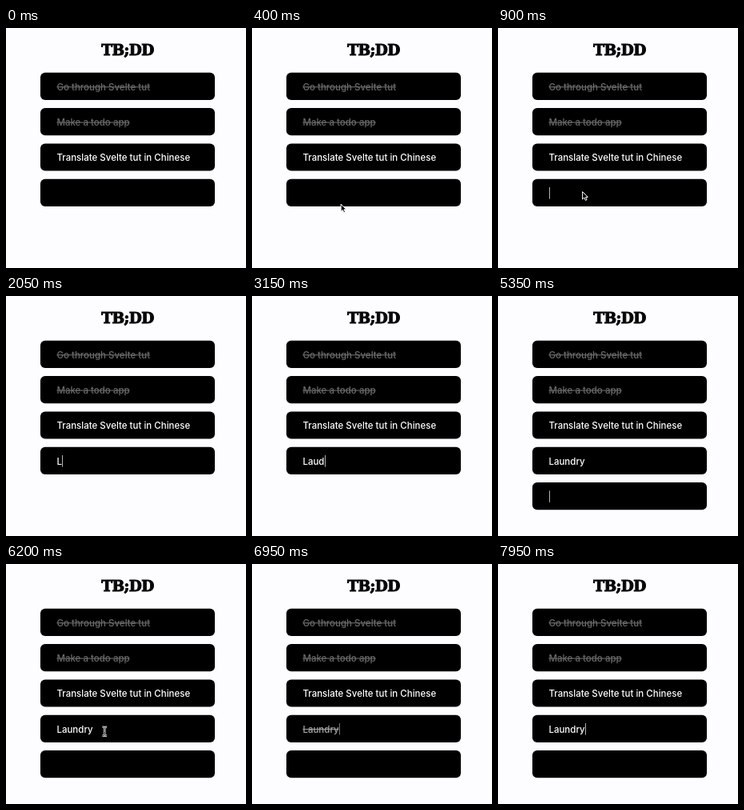
An HTML page with a canvas that plays this animation: 300 by 300 pixels, repeating every 8 s.

```html
<!DOCTYPE html>
<html lang="en">
<head>
<meta charset="utf-8">
<title>Todo list</title>
<style>
  html, body { margin: 0; width: 100%; height: 100%; overflow: hidden; background: #fdfcff; }
  canvas { display: block; width: 300px; height: 300px; }
</style>
</head>
<body>
<canvas id="stage"></canvas>
<script>
const SIZE = 300, LOOP = 8000, STEP = 50;
const ROW = { x: 42.95, y: 55.8, w: 218.1, h: 34.2, gap: 44.3, r: 6 };
const TEXT_X = 63.4, BASELINE = 21.9, DIM = 0.42;

const canvas = document.getElementById('stage');
const ctx = canvas.getContext('2d');
const dpr = window.devicePixelRatio || 1;
canvas.width = canvas.height = SIZE * dpr;
ctx.scale(dpr, dpr);

// [time, text] of the fourth item
const typing = [
  [0, ''], [2000, 'L'], [2250, 'La'], [2550, 'Lau'], [3150, 'Laud'], [3850, 'Lau'],
  [4050, 'Laun'], [4550, 'Laund'], [4850, 'Laundr'], [5050, 'Laundry']
];
// [time, row holding the visible caret, or -1]
const carets = [
  [0, -1], [900, 3], [1450, -1], [1950, 3], [3050, -1], [3150, 3], [3650, -1],
  [4050, 3], [5350, 4], [5850, -1], [6350, 4], [6550, 3], [7500, -1], [7800, 3]
];

const at = (keys, t) => keys.filter(k => k[0] <= t).pop()[1];
const clamp = v => Math.min(1, Math.max(0, v));
const mix = (a, b, u) => a + (b - a) * u;
const easeOut = u => 1 - (1 - u) ** 2;
const rowY = i => ROW.y + i * ROW.gap;
const gray = v => `rgb(${[v, v, v].map(c => Math.round(c * 255))})`;

function drawTitle() {
  ctx.font = '700 18.5px "DejaVu Serif", "Noto Serif", serif';
  ctx.letterSpacing = '-0.6px';
  ctx.textAlign = 'center';
  ctx.fillStyle = ctx.strokeStyle = '#080808';
  ctx.lineWidth = 1;
  ctx.lineJoin = 'miter';
  ctx.fillText('TB;DD', 152, 34);
  ctx.strokeText('TB;DD', 152, 34);
  ctx.letterSpacing = '0px';
}

function drawRow(i, text, light = 1, struck = false) {
  const y = rowY(i);
  ctx.fillStyle = '#000';
  ctx.beginPath();
  ctx.roundRect(ROW.x, y, ROW.w, ROW.h, ROW.r);
  ctx.fill();

  ctx.font = '500 11.5px Inter, Roboto, sans-serif';
  ctx.textAlign = 'left';
  ctx.fillStyle = gray(light);
  ctx.fillText(text, TEXT_X, y + BASELINE);
  const width = ctx.measureText(text).width;
  if (struck) ctx.fillRect(TEXT_X, y + BASELINE - 4.5, width, 1.1);
  return TEXT_X + width;
}

function drawCaret(i, x, light) {
  ctx.fillStyle = gray(0.7 * light);
  ctx.fillRect(Math.ceil(x), rowY(i) + 10.3, 1, 14.6);
}

function drawArrow(x, y) {
  ctx.save();
  ctx.translate(x, y);
  ctx.beginPath();
  [[0.6, 0.6], [0.6, 10], [2.8, 8], [4.3, 11.4], [6, 10.7], [4.5, 7.4], [7.3, 7.4]]
    .forEach(p => ctx.lineTo(...p));
  ctx.closePath();
  ctx.fillStyle = '#000';
  ctx.strokeStyle = '#fff';
  ctx.lineWidth = 1;
  ctx.fill();
  ctx.stroke();
  ctx.restore();
}

function drawBeam(x, y) {
  ctx.save();
  ctx.translate(x, y);
  ctx.beginPath();
  ctx.moveTo(-2.8, -5.5);
  ctx.quadraticCurveTo(0, -5.5, 0, -3.8);
  ctx.quadraticCurveTo(0, -5.5, 2.8, -5.5);
  ctx.moveTo(0, -3.8);
  ctx.lineTo(0, 3.8);
  ctx.moveTo(-2.8, 5.5);
  ctx.quadraticCurveTo(0, 5.5, 0, 3.8);
  ctx.quadraticCurveTo(0, 5.5, 2.8, 5.5);
  ctx.moveTo(-1.5, 1.8);
  ctx.lineTo(1.5, 1.8);
  for (const [color, width] of [['#fff', 2.4], ['#000', 0.8]]) {
    ctx.strokeStyle = color;
    ctx.lineWidth = width;
    ctx.stroke();
  }
  ctx.restore();
}

function drawPointer(t) {
  if (t >= 50 && t < 2000) {
    const u = easeOut(clamp((t - 50) / 600));
    drawArrow(mix(137, 105, u), mix(293, 204, u));
  } else if (t >= 6050 && t < 6100) {
    drawArrow(105, 204);
  } else if (t >= 6100 && t < 6850) {
    const u = easeOut(clamp((t - 6050) / 150));
    drawBeam(mix(108, 123.3, u), mix(208, 209.3, u));
  }
}

function draw(t) {
  ctx.fillStyle = '#fdfcff';
  ctx.fillRect(0, 0, SIZE, SIZE);
  drawTitle();
  drawRow(0, 'Go through Svelte tut', DIM, true);
  drawRow(1, 'Make a todo app', DIM, true);
  drawRow(2, 'Translate Svelte tut in Chinese');

  const done = clamp((t - 6800) / 250) - clamp((t - 7750) / 200);
  const light = mix(1, DIM, done);
  const end = drawRow(3, at(typing, t), light, t >= 6850 && t < 7800);
  if (t >= 5350) drawRow(4, '');

  const caret = at(carets, t);
  if (caret === 3) drawCaret(3, end, light);
  if (caret === 4) drawCaret(4, TEXT_X, 1);
  drawPointer(t);
}

const start = performance.now();
function tick() {
  const t = (performance.now() - start) % LOOP;
  draw(Math.floor(t / STEP) * STEP);
  requestAnimationFrame(tick);
}
tick();
</script>
</body>
</html>
```
